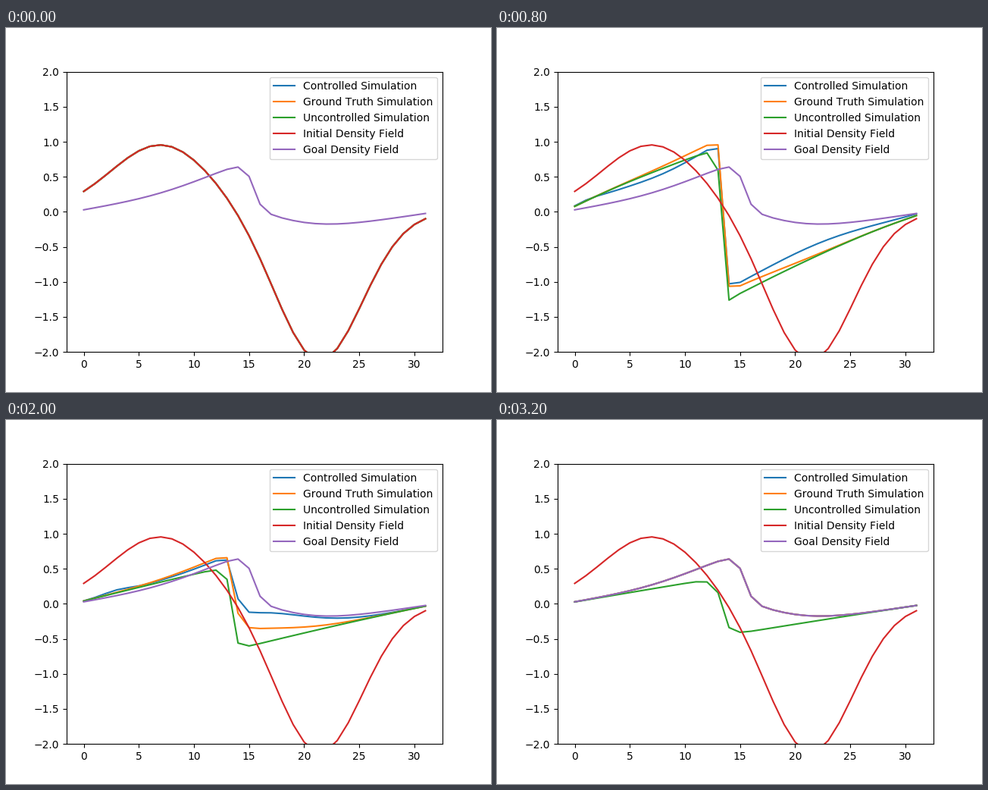
Animation, 640 px wide and 480 px high, one loop 3300 ms. Source, as a matplotlib script:

```python
import numpy as np
import matplotlib.pyplot as plt
from matplotlib.animation import FuncAnimation

plt.rcParams["font.family"] = "DejaVu Sans"
plt.rcParams["text.kerning_factor"] = 6

CELLS, STEPS = 32, 32
DT = 0.03
SHIFT = DT * CELLS                # cells travelled per step at unit speed
DIFFUSION = 0.003 * DT * CELLS**2
x = np.arange(CELLS)


def bump(amp, center, sigma):
    return amp * np.exp(-0.5 * ((x - center) / sigma) ** 2)


def advance(u, push):
    """One Burgers step: diffusion, semi-Lagrangian advection, forcing."""
    v = u + DIFFUSION * np.diff(np.pad(u, 1), 2)
    return np.interp(x - SHIFT * v, np.arange(-1, CELLS + 1), np.pad(v, 1)) + push


def simulate(start, push):
    states = [start]
    for _ in range(STEPS):
        states.append(advance(states[-1], push))
    return np.array(states)


def control_offset(step):
    """Lead of the controlled run: ahead behind the shock, lagging before it."""
    ahead = bump(np.interp(step, [0, 8, 24, 32], [0, 0.15, 0.25, 0]), 26 - 0.5 * step, 4.7)
    lag = bump(np.interp(step, [0, 8, 16, 32], [0, 0.11, 0.045, 0]), 6 + 0.3 * step, 3.8)
    inflow = bump(0.04 * np.sin(np.pi * step / STEPS), 0.15 * step, 1.2)
    return np.where(x > 13, ahead, inflow - lag)


initial = bump(0.957, 6.97, 4.52) - bump(2.125, 21.41, 3.87)
force = bump(0.032, 14.5, 4.3)

uncontrolled = simulate(initial, 0)
truth = simulate(initial, force)
controlled = truth + [control_offset(step) for step in range(STEPS + 1)]
goal = truth[-1]

fig, ax = plt.subplots(figsize=(6.4, 4.8), dpi=100)
moving = []
for label, states in [("Controlled Simulation", controlled),
                      ("Ground Truth Simulation", truth),
                      ("Uncontrolled Simulation", uncontrolled)]:
    line, = ax.plot(x, states[0], label=label)
    moving.append((line, states))
ax.plot(x, initial, label="Initial Density Field")
ax.plot(x, goal, label="Goal Density Field")
ax.set_ylim(-2, 2)
ax.legend(loc="upper right")


def draw(step):
    for line, states in moving:
        line.set_ydata(states[step])
    return [line for line, _ in moving]


anim = FuncAnimation(fig, draw, frames=STEPS + 1, interval=100,
                     repeat=True, repeat_delay=0)
plt.show()
```
